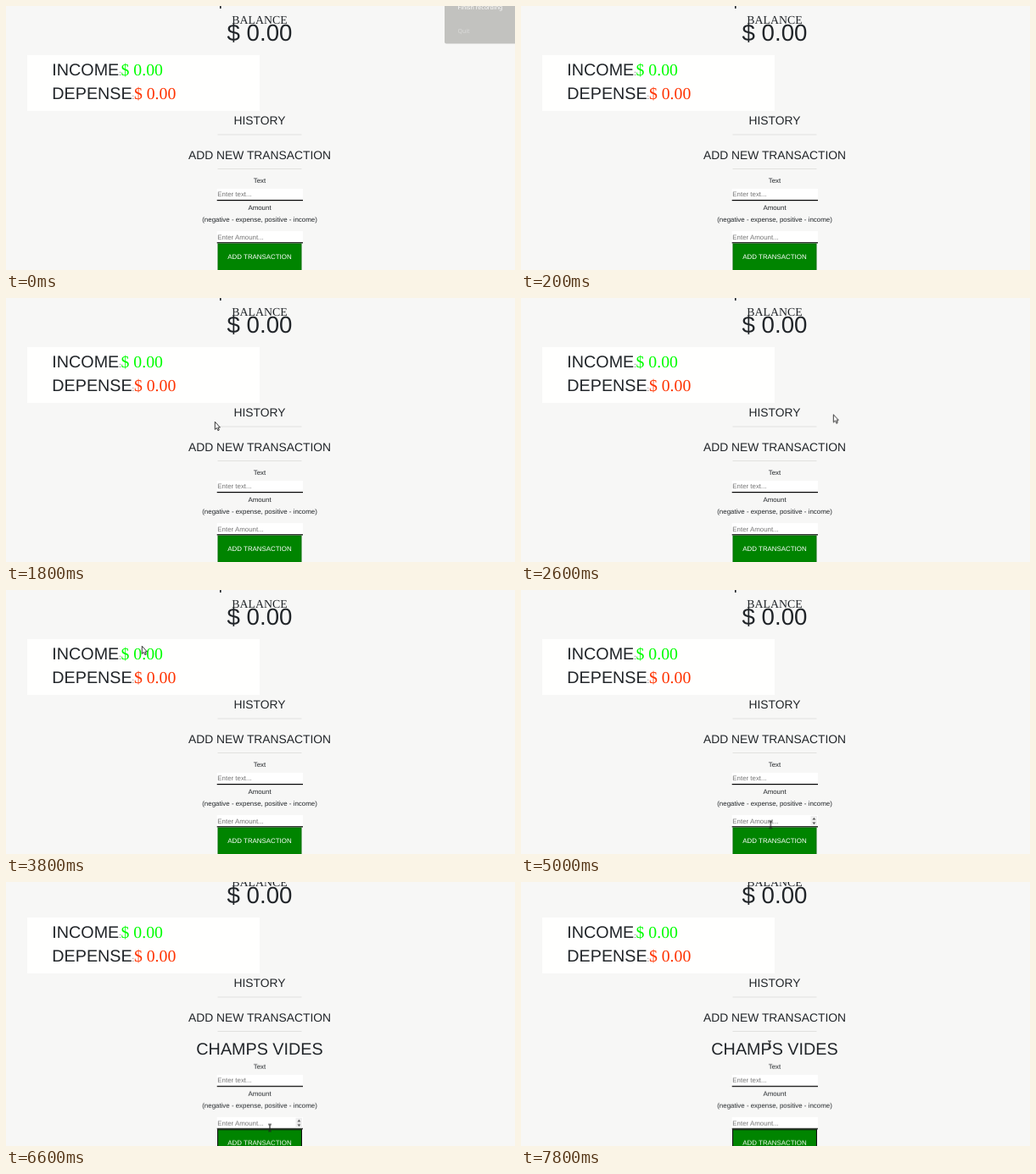
An HTML page that plays this animation: 600 px wide and 312 px high, repeating every 8 s.

```html
<!DOCTYPE html>
<html lang="en">
<head>
<meta charset="utf-8">
<title>Balance</title>
<style>
  html, body { margin: 0; width: 100%; height: 100%; overflow: hidden; background: #f7f7f6; }
  svg { display: block; width: 600px; height: 312px; }
  text { font-family: "Liberation Sans", Arial, sans-serif; font-size: 7.9px; fill: #212529; text-rendering: geometricPrecision; white-space: pre; }
  .mid { text-anchor: middle; }
  .serif { font-family: "Liberation Serif", Times, serif; }
  .h2 { font-size: 19.76px; }
  .h3 { font-size: 13.83px; }
  .total { font-size: 27.66px; }
  .income { fill: #0f0; }
  .expense { fill: #f30; }
  .hint { fill: #757575; }
  .rule { fill: #e1e1df; }
  .field { fill: #fff; }
  .menu text { font: 500 7px "Noto Sans", sans-serif; fill: #fff; }

  .top, .form, .error, .focus, .spin, .menu, .cursor, .arrow, .beam, .hand {
    animation: 8s step-end infinite;
  }
  .top { animation-name: scroll-up; }
  .form { animation-name: push-down; }
  .error, .focus { animation-name: after-click; }
  .menu { animation-name: menu; }
  .spin { animation-name: spin; }
  .cursor { animation-name: travel; }
  .arrow { animation-name: arrow; }
  .beam { animation-name: beam; }
  .hand { animation-name: hand; }

  @keyframes scroll-up { 0% { transform: none; } 82.5%, 100% { transform: translateY(-16px); } }
  @keyframes push-down { 0% { transform: none; } 82.5%, 100% { transform: translateY(11.8px); } }
  @keyframes after-click { 0% { opacity: 0; } 82.5%, 100% { opacity: 1; } }
  @keyframes menu { 0% { opacity: 1; } 2.5%, 100% { opacity: 0; } }
  @keyframes spin { 0%, 70%, 87.5%, 100% { opacity: 0; } 62.5%, 82.5% { opacity: 1; } }
  @keyframes arrow { 0% { opacity: 1; } 60%, 100% { opacity: 0; } }
  @keyframes beam { 0%, 70% { opacity: 0; } 60%, 82.5%, 100% { opacity: 1; } }
  @keyframes hand { 0%, 82.5%, 100% { opacity: 0; } 70% { opacity: 1; } }

  @keyframes travel {
    0% { transform: translate(-50px, -50px); }
    10% { transform: translate(348px, 49px); }
    12.5% { transform: translate(325.5px, 69.5px); }
    15% { transform: translate(290px, 94px); }
    17.5% { transform: translate(256px, 124px); }
    20% { transform: translate(238.5px, 149px); }
    22.5% { transform: translate(246px, 146px); }
    25% { transform: translate(262px, 200px); }
    27.5% { transform: translate(305px, 243px); }
    30% { transform: translate(348px, 195px); }
    32.5% { transform: translate(368px, 137.5px); }
    35% { transform: translate(270px, 136px); }
    37.5% { transform: translate(147px, 146px); }
    40% { transform: translate(102px, 128px); }
    42.5% { transform: translate(85px, 92px); }
    45% { transform: translate(106px, 61px); }
    47.5% { transform: translate(160px, 66px); }
    50% { transform: translate(222px, 78px); }
    52.5% { transform: translate(270px, 86px); }
    57.5% { transform: translate(281px, 150px); }
    60% { transform: translate(289px, 223px); }
    62.5% { transform: translate(294.3px, 277.5px); }
    65% { transform: translate(301px, 276px); }
    67.5% { transform: translate(312px, 278px); }
    70% { transform: translate(328px, 289px); }
    72.5% { transform: translate(300.5px, 289px); }
    75% { transform: translate(307.5px, 288.5px); }
    82.5% { transform: translate(311px, 290.5px); }
    85% { transform: translate(313px, 283px); }
    87.5% { transform: translate(318px, 264px); }
    90% { transform: translate(326px, 238px); }
    92.5% { transform: translate(334px, 210px); }
    95% { transform: translate(338px, 191px); }
    97.5%, 100% { transform: translate(293px, 192px); }
  }
</style>
</head>
<body>
<svg viewBox="0 0 600 312">
  <rect width="600" height="312" fill="#f7f7f6"/>

  <g class="top">
    <rect x="252" y="0" width="1.6" height="3" fill="#212529"/>
    <text class="mid h3 serif" x="299" y="21.3">BALANCE</text>
    <text class="mid total" x="299" y="41.3">$ 0.00</text>
    <rect x="25" y="58" width="274" height="66" fill="#fffffe"/>
    <text x="54.3" y="82"><tspan class="h2">INCOME</tspan>:<tspan class="h2 serif income">$ 0.00</tspan></text>
    <text x="54.3" y="110"><tspan class="h2">DEPENSE</tspan>:<tspan class="h2 serif expense">$ 0.00</tspan></text>
    <text class="mid h3" x="299" y="140.4">HISTORY</text>
    <rect class="rule" x="249.5" y="151.5" width="99" height="1"/>
    <text class="mid h3" x="299" y="181">ADD NEW TRANSACTION</text>
    <rect class="rule" x="249.5" y="192" width="99" height="1"/>
  </g>

  <text class="error mid h2" x="299" y="203.5">CHAMPS VIDES</text>

  <g class="form">
    <text class="mid" x="299" y="208.8">Text</text>
    <rect class="field" x="248.7" y="216" width="101.3" height="14"/>
    <rect x="248.7" y="229" width="101.3" height="1.2"/>
    <text class="hint" x="249.3" y="225.3">Enter text...</text>
    <text class="mid" x="299" y="241.4">Amount</text>
    <text class="mid" x="299" y="255.2">(negative - expense, positive - income)</text>
    <rect class="field" x="248.7" y="266" width="101.3" height="14"/>
    <rect x="248.7" y="279.2" width="101.3" height="1.2"/>
    <text class="hint" x="249.3" y="275.5">Enter Amount...</text>
    <g class="spin">
      <rect x="341.5" y="267" width="7.5" height="11.5" fill="#efefef"/>
      <path d="M343.4 271.4l2-2.4 2 2.4zM343.4 274.6l2 2.4 2-2.4z" fill="#505050"/>
    </g>
    <rect x="250" y="281" width="98" height="40" fill="#008400" stroke="#006c00"/>
    <rect class="focus" x="249.5" y="280.7" width="99" height="41" fill="none" stroke="#101010"/>
    <text class="mid" x="299" y="298.8" style="fill:#fff">ADD TRANSACTION</text>
  </g>

  <g class="menu">
    <path d="M517 0H600V44.5H519a2 2 0 0 1-2-2z" fill="#c2c2bf"/>
    <text x="532.5" y="3.6">Finish recording</text>
    <text x="532.5" y="31.8" opacity=".4">Quit</text>
  </g>

  <g class="cursor">
    <path class="arrow" d="M.3.3V9.4L2.4 7.5 3.9 10.7 5.3 10 3.9 7H6.4z" fill="#fff" stroke="#222" stroke-width=".9"/>
    <path class="beam" d="M-2-4H-.5L0-3.5.5-4H2M0-3.5V3.5M-2 4H-.5L0 3.5.5 4H2" fill="none" stroke="#222" stroke-width="1.1"/>
    <path class="hand" d="M2.2 1.2q.9-1 1.6 0V4L8 4.8q.8.3.7 1.4L8 9.6H4L.6 6.4q.2-1.2 1.6-.2z" fill="#fff" stroke="#222" stroke-width=".7"/>
  </g>
</svg>
</body>
</html>
```
